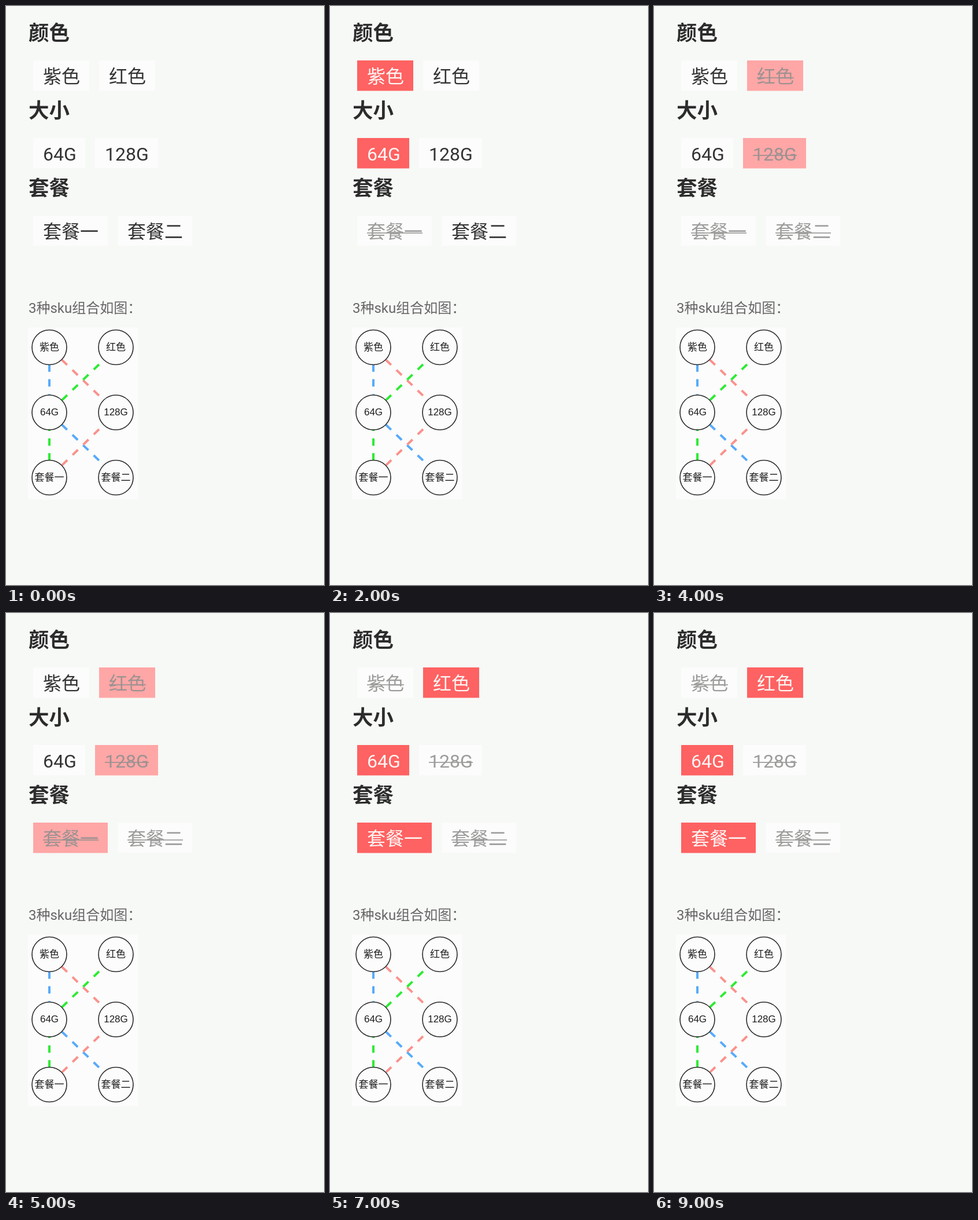
Write an HTML page that moves like this. It is 550x1000 px and loops after 10000 ms.

```html
<!DOCTYPE html>
<html lang="zh-CN">
<head>
<meta charset="utf-8">
<style>
  html, body { margin: 0; height: 100%; overflow: hidden; background: #f7f9f6; }
  svg { display: block; font: 32px Roboto, "Noto Sans CJK SC", sans-serif; fill: #333; }
  .heading { font-size: 35.5px; font-weight: 700; fill: #2c2c2c; }
  .caption { font-size: 24px; fill: #666; }
  .node { font: 17px "Liberation Sans", "Noto Sans CJK SC", sans-serif; text-anchor: middle; fill: #1c1c1c; }
  .toast { font: 19px "Noto Sans", "Noto Sans CJK SC", sans-serif; text-anchor: middle; fill: #222; }
  .box { fill: #fdfefd; filter: drop-shadow(0 6px 12px #dfe3df); }
</style>
</head>
<body>
<svg id="stage" width="550" height="1000" viewBox="0 0 550 1000"></svg>
<script>
const groups = [
  { title: '颜色', options: [['紫色', 47, 97], ['红色', 161, 97]] },
  { title: '大小', options: [['64G', 47, 90], ['128G', 154, 109]] },
  { title: '套餐', options: [['套餐一', 47, 129], ['套餐二', 193, 129]] },
];
// Each valid combination: option index per group
const combos = [[0, 0, 1], [0, 1, 0], [1, 0, 0]];
// Selection during each second of the loop
const steps = [[], [0], [0, 0], [0, 1], [1, 1], [1, 1, 0], [1, 1, 0], [1, 0, 0], [1, 0, 0], [1, 0, 0]];
const toasts = {
  6: ['FakeApp：无效sku', 204],
  8: ['FakeApp：有效sku：红色 64G 套餐一', 372],
};

const text = (x, y, label, attrs = '') => `<text x="${x}" y="${y}" ${attrs}>${label}</text>`;
const rect = (x, y, w, h, attrs) => `<rect x="${x}" y="${y}" width="${w}" height="${h}" ${attrs}/>`;
const dash = (x1, y1, x2, y2, color) =>
  `<path d="M${x1} ${y1}L${x2} ${y2}" stroke="${color}" stroke-width="4" stroke-dasharray="12.75"/>`;

const isAvailable = (selection, group, option) => combos.some(combo =>
  combo[group] === option && selection.every((chosen, g) => g === group || combo[g] === chosen));

function chip(selection, group, option) {
  const [label, x, width] = groups[group].options[option];
  const y = 94 + group * 134;
  const selected = selection[group] === option;
  const enabled = isAvailable(selection, group, option);
  const fill = !selected ? '#fbfcfb' : enabled ? '#fe6262' : '#ffa6a6';
  const color = enabled ? (selected ? '#fff6f4' : '#333') : (selected ? '#9c9292' : '#9c9c9a');
  const strike = enabled ? '' : rect(x + 17, y + 29.2, width - 33, 1.7, `fill="${color}"`);
  return rect(x, y, width, 52.5, `fill="${fill}"`) +
    text(x + 17, y + 39, label, `style="fill:${color}"`) + strike;
}

function diagram() {
  const pink = '#fb918c', blue = '#58aafa', green = '#2eea34';
  const nodes = groups.flatMap(({ options }, g) => options.map(([label], i) => {
    const x = 75 + i * 115, y = 589.5 + g * 112.5;
    return `<circle cx="${x}" cy="${y}" r="30" fill="none" stroke="#2a2a2a" stroke-width="1.6"/>` +
      text(x, y + 5, label, 'class="node"');
  }));
  return rect(38, 555, 191, 297, 'fill="#fbfcfb"') +
    dash(75, 619, 75, 671, blue) + dash(96.5, 723, 161, 785, blue) +
    dash(96.5, 611, 161, 673, pink) + dash(161, 731, 96.5, 793.5, pink) +
    dash(161, 619, 96.5, 681, green) + dash(75, 785, 75, 731, green) +
    nodes.join('');
}

function toast([label, width]) {
  return rect(274 - width / 2, 928, width, 69, 'rx="22" class="box"') +
    text(274.5, 969, label, 'class="toast"');
}

const fixed = groups.map(({ title }, g) => text(39, 58.5 + g * 134, title, 'class="heading"')).join('') +
  text(39, 530, '3种sku组合如图：', 'class="caption"') + diagram();

const stage = document.getElementById('stage');
let shown = -1;
function draw() {
  const step = Math.floor(performance.now() / 1000) % steps.length;
  if (step !== shown) {
    shown = step;
    const chips = groups.map((_, g) => chip(steps[step], g, 0) + chip(steps[step], g, 1)).join('');
    stage.innerHTML = fixed + chips + (toasts[step] ? toast(toasts[step]) : '');
  }
  requestAnimationFrame(draw);
}
draw();
</script>
</body>
</html>
```
